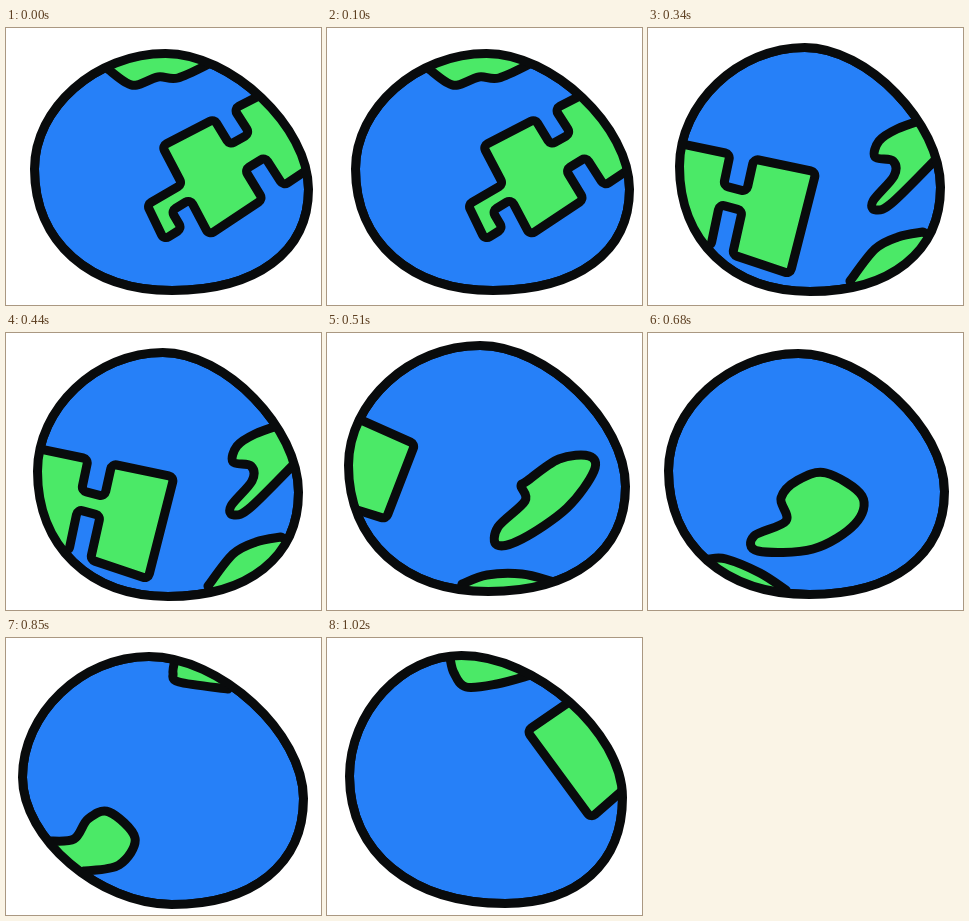
An HTML page with a canvas for the animation above (1.19 s loop, 315 by 277 pixels).

```html
<!DOCTYPE html>
<html lang="en">
<head>
<meta charset="utf-8">
<title>Spinning globe</title>
<style>
  html, body { margin: 0; width: 100%; height: 100%; overflow: hidden; background: #fff; }
  canvas { display: block; }
</style>
</head>
<body>
<canvas width="315" height="277"></canvas>
<script>
const HOLD = 170, LINE = 9;
const INK = '#090b0c', SEA = '#2680f8', LAND = '#4be967';
const CENTER = [158, 140];
const ctx = document.querySelector('canvas').getContext('2d');

const mix = (a, b, t) => a.map((v, i) => v + (b[i] - v) * t);
const parse = text => text.split(' ').map(p => p.split(',').map(Number));

// Lopsided egg filling a box: four extreme points joined by quarter arcs.
function egg(left, top, right, bottom, lean, lowLeft = 0.6) {
  const inset = LINE / 2;
  const [l, t, r, b] = [left + inset, top + inset, right - inset, bottom - inset];
  const x = f => l + (r - l) * f, y = f => t + (b - t) * f;
  const ends = [[x(0.49 - lean), t], [r, y(0.573)], [x(0.49 + lean), b], [l, y(0.487)]];
  const corners = [[r, t], [r, b], [l, b], [l, t]];
  const path = new Path2D();
  path.moveTo(...ends[0]);
  [0.46, 0.62, lowLeft, 0.53].forEach((roundness, i) => {
    const from = ends[i], to = ends[(i + 1) % 4];
    path.bezierCurveTo(...mix(from, corners[i], roundness), ...mix(to, corners[i], roundness), ...to);
  });
  path.closePath();
  return path;
}

// Catmull-Rom curve; an open one is a coast that continues beyond the rim.
function curve(text, closed) {
  const pts = parse(text), n = pts.length, path = new Path2D();
  const at = i => pts[closed ? (i + n) % n : Math.max(0, Math.min(n - 1, i))];
  path.moveTo(...pts[0]);
  for (let i = 0; i < (closed ? n : n - 1); i++) {
    const [a, b, c, d] = [at(i - 1), at(i), at(i + 1), at(i + 2)];
    path.bezierCurveTo(b[0] + (c[0] - a[0]) / 6, b[1] + (c[1] - a[1]) / 6,
      c[0] - (d[0] - b[0]) / 6, c[1] - (d[1] - b[1]) / 6, ...c);
  }
  if (!closed) [pts[n - 1], pts[0]].forEach(p => path.lineTo(...mix(CENTER, p, 2)));
  path.closePath();
  return path;
}
const coast = text => curve(text, false);
const island = text => curve(text, true);

// Two blocks joined by a neck, with a hooked tail, fitted into four corners.
function puzzle(corners, neckTop = 0.34, neckBottom = 0.54, sag = 0) {
  const [tl, tr, br, bl] = parse(corners);
  const [a, b] = [0.42, 0.58];
  const pts = [
    [0, 0], [a, 0], [a, neckTop], [b, neckTop], [b, 0], [1, 0],
    [1, 1], [b, 1], [b, neckBottom], [a, neckBottom], [a, 1], [0, 1],
    [0, 0.6], [-0.15, 0.6], [-0.14, 0.8], [-0.28, 0.8], [-0.28, 0.43], [0, 0.43]
  ].map(([u, v]) => {
    const [x, y] = mix(mix(tl, tr, u), mix(bl, br, u), v);
    return [x, y + 4 * sag * u * (1 - u)];
  });
  const path = new Path2D();
  path.moveTo(...mix(pts[pts.length - 1], pts[0], 0.5));
  pts.forEach((p, i) => path.arcTo(...p, ...pts[(i + 1) % pts.length], 5));
  path.closePath();
  return path;
}

function paint(path, color) {
  ctx.fillStyle = color;
  ctx.fill(path);
  ctx.stroke(path);
}

const poses = [
  [egg(24, 21, 307, 267, 0.012),
    coast('103,42 119,54 131,57 152,49 172,50 205,35'),
    puzzle('156,118 280,54 331,122 203,207', 0.32, 0.63)],
  [egg(21, 18, 306, 266, 0),
    coast('82,47 95,53 106,50 138,55 151,44 158,24'),
    puzzle('105,134 236,97 267,193 117,223', 0.43, 0.58, 8)],
  [egg(27, 15, 297, 268, 0.01),
    puzzle('20,113 168,144 142,246 5,200'),
    coast('277,91 249,101 231,113 227,129 245,133 246,148 225,173 228,182 245,174 293,126'),
    coast('202,253 227,221 250,209 275,204')],
  [egg(17, 8, 303, 263, 0.015),
    puzzle('-92,31 88,111 59,186 -111,133'),
    island('200,148 232,126 262,123 267,138 240,175 195,206 170,212 171,194 198,168 194,153'),
    coast('135,251 160,242 195,241 224,248')],
  [egg(16, 16, 301, 266, 0.02),
    island('133,165 150,147 178,140 214,163 207,191 165,216 110,218 106,203 138,188'),
    coast('61,226 78,226 112,240 138,257')],
  [egg(12, 14, 302, 271, 0.04, 0.48),
    coast('42,203 68,201 82,181 103,174 129,200 113,227 78,233'),
    coast('169,22 167,35 173,44 222,51')],
  [egg(18, 13, 300, 270, 0.08),
    coast('123,20 127,35 139,49 170,46 204,37'),
    puzzle('440,-72 200,93 264,180 464,5')]
];

function draw(time) {
  const [ball, ...lands] = poses[Math.floor(time / HOLD) % poses.length];
  ctx.fillStyle = '#fff';
  ctx.fillRect(0, 0, 315, 277);
  ctx.strokeStyle = INK;
  ctx.lineWidth = LINE;
  ctx.lineJoin = 'round';
  ctx.save();
  ctx.clip(ball);
  paint(ball, SEA);
  lands.forEach(land => paint(land, LAND));
  ctx.restore();
  ctx.stroke(ball);
}

const start = performance.now();
function tick() {
  draw(performance.now() - start);
  requestAnimationFrame(tick);
}
tick();
</script>
</body>
</html>
```
